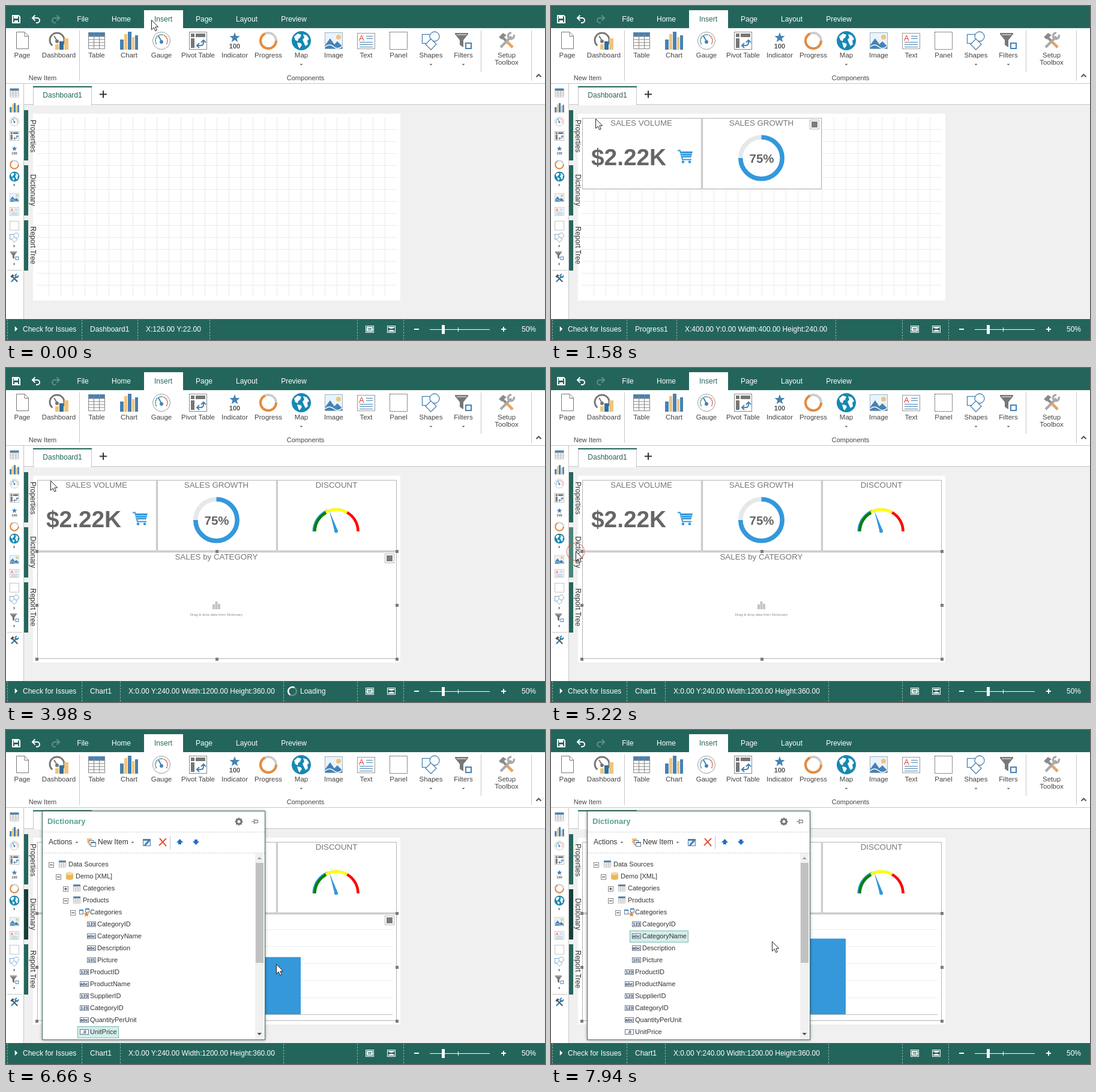
Write an HTML page that moves like this. It is 898x558 px and loops after 8 s.

```html
<!DOCTYPE html>
<html lang="en">
<head>
<meta charset="utf-8">
<title>Dashboard designer</title>
<style>
html, body { margin: 0; width: 100%; height: 100%; overflow: hidden; background: #fff; }
svg { display: block; width: 898px; height: 558px; font-family: "Liberation Sans", Arial, sans-serif; }
</style>
</head>
<body>
<svg id="stage" viewBox="0 0 898 558" xmlns="http://www.w3.org/2000/svg"></svg>
<script>
const GREEN = '#24655b', BLUE = '#3498db', STEEL = '#4682b4', GRAY = '#777', SAND = '#f0c47c';
const LINE = '#c6c6c6', INK = '#444';

// Markup helpers
const rect = (x, y, w, h, fill, more = '') => `<rect x="${x}" y="${y}" width="${w}" height="${h}" fill="${fill}" ${more}/>`;
const box = (x, y, w, h, stroke, fill = '#fff', more = '') => rect(x + .5, y + .5, w - 1, h - 1, fill, `stroke="${stroke}" ${more}`);
const fill = (d, color, more = '') => `<path d="${d}" fill="${color}" ${more}/>`;
const line = (d, color, w = 1, more = '') => `<path d="${d}" fill="none" stroke="${color}" stroke-width="${w}" ${more}/>`;
const dot = (x, y, r, color, more = '') => `<circle cx="${x}" cy="${y}" r="${r}" fill="${color}" ${more}/>`;
const text = (x, y, s, size, color, more = '') => `<text x="${x}" y="${y}" font-size="${size}" fill="${color}" ${more}>${s}</text>`;
const mid = (x, y, s, size, color, more = '') => text(x, y, s, size, color, 'text-anchor="middle" ' + more);
const group = (s, more = '') => `<g ${more}>${s}</g>`;
const hidden = (id, s) => group(s, `id="${id}" display="none"`);
const at = (x, y, s, k = 1) => group(s, `transform="translate(${x} ${y}) scale(${k})"`);
const down = (x, y, w = 3, color = '#666') => fill(`M${x - w} ${y - w / 2}h${2 * w}l${-w} ${w}z`, color);
const right = (x, y, w = 3, color = '#666') => fill(`M${x - w / 2} ${y - w}v${2 * w}l${w} ${-w}z`, color);
const list = (n, f) => Array.from({ length: n }, (_, i) => f(i)).join('');

// Angles run clockwise from the top, in degrees
function arc(cx, cy, r, a0, a1) {
  const p = a => `${(cx + r * Math.sin(a * Math.PI / 180)).toFixed(2)} ${(cy - r * Math.cos(a * Math.PI / 180)).toFixed(2)}`;
  return `M${p(a0)}A${r} ${r} 0 ${a1 - a0 > 180 ? 1 : 0} 1 ${p(a1)}`;
}

function star(r) {
  const p = i => {
    const a = i * Math.PI / 5, q = i % 2 ? r * .42 : r;
    return `${(q * Math.sin(a)).toFixed(2)} ${(-q * Math.cos(a)).toFixed(2)}`;
  };
  return 'M' + Array.from({ length: 10 }, (_, i) => p(i)).join('L') + 'Z';
}

const tableIcon = rect(-14, -14, 28, 28, '#fff') + rect(-14, -14, 28, 7, STEEL) +
  line('M-13.5-14V13.5H13.5V-14M-4.5-14V13M4.5-14V13M-14-7H14M-14-2H14M-14 3H14M-14 8H14', '#858585');
const funnel = fill('M-11-13H11V-11L3-1V11L-3 7V-1L-11-11Z', GRAY) + line('M-8-10H8', '#fff');
const tools = (a, b) =>
  line('M-8-7L10 11', a, 4) + fill('M-13-6L-6-13L0-9L-3-7L-8-2Z', a) +
  line('M8-7L-10 11', b, 4) + line('M12-10A5 5 0 1 1 8-13', b, 3.5);

// Icons are drawn around 0,0 in a box of 30
const icons = {
  page: fill('M-9.500-14.500H4L10.500-8V13.500H-9.500Z', '#fff', `stroke="${GRAY}"`) + line('M4-14V-7.500H10', GRAY),
  dash: line(arc(-3, -1, 12, -140, 140), GRAY, 3) + line('M-3 0L-8-8', GRAY, 2) + dot(-3, 1, 3, GRAY) +
    rect(-6, 6, 6, 9, SAND) + rect(1, 1, 7, 14, '#2f6f9f') + rect(9, -4, 7, 19, SAND),
  table: tableIcon,
  chart: rect(-15, -2, 6, 17, STEEL) + rect(-8, -11, 5, 26, SAND) + rect(-2, -15, 6, 30, STEEL) +
    rect(5, -6, 4, 21, SAND) + rect(10, -9, 5, 24, STEEL),
  gauge: dot(0, 0, 14.5, '#fff', 'stroke="#999"') + line(arc(0, 0, 10, -125, 20), '#3f8f93', 2, 'stroke-dasharray="2 1"') +
    line(arc(0, 0, 10, 25, 125), '#d9604f', 2, 'stroke-dasharray="2 1"') + line('M0 1L-5-8', STEEL, 2) + dot(0, 2, 3, STEEL),
  pivot: box(-15, -15, 30, 30, '#888') + rect(-12, -12, 6, 6, GRAY) + rect(-4, -12, 16, 6, GRAY) + rect(-12, -4, 6, 16, GRAY) +
    line('M-1 8H4Q9 8 9 3V0M2 4L-2 8L2 12M5 3L9-1L13 3', STEEL, 2),
  indicator: at(0, -5, fill(star(9), STEEL)) + mid(0, 13, '100', 11, '#555', 'font-weight="bold"'),
  progress: dot(0, 0, 13, 'none', 'stroke="#ccc" stroke-width="4"') + line(arc(0, 0, 13, 90, 335), '#e88a3c', 4),
  map: dot(0, 0, 16, '#1688b2') + fill('M-12-7L-6-12L0-10L-2-5L-5-3L-6 1L-10-1ZM-7 3L-1 4L1 7L-3 13L-5 10ZM3-11L9-9L13-3L10 0L11 6L7 9L4 3L2-2L5-5Z', '#fff'),
  image: box(-15, -14, 30, 28, '#9bb4c8', '#eaf3fa') + dot(8, -6, 4, SAND) +
    fill('M-14 7L-6-4L1 6L6 1L14 9V13H-14Z', STEEL) + line('M-14 10Q-7 4 0 10T14 9', '#fff', 1.5),
  text: box(-15, -13, 30, 27, '#999') + text(-12, 0, 'A', 13, '#e03c32') +
    line('M0-7.500H11M0-3.500H11M-11 2.500H11M-11 6.500H11M-11 10.500H11', STEEL),
  panel: box(-15, -15, 30, 30, '#555', '#fff', 'stroke-dasharray="2 1"'),
  shapes: group(box(-15, -11, 16, 16, STEEL) + dot(6, -7, 8, '#fff', `stroke="${STEEL}"`) +
    fill('M0-3L9 6L0 15L-9 6Z', '#fff', `stroke="${STEEL}"`), 'stroke-width="1.3"'),
  filter: at(-3, 0, funnel) + rect(4, 4, 9, 9, '#fff', `stroke="${STEEL}" stroke-width="2"`),
  tools: tools('#8a8a8a', '#a9a9a9') + line('M1 2L10 11', '#e9a35c', 4),
  toolsDark: tools('#4a5560', '#2f7aa8')
};

function topBar() {
  const names = [['File', 128], ['Home', 192], ['Insert', 262], ['Page', 330], ['Layout', 401], ['Preview', 479.5]];
  return rect(0, 0, 898, 37, GREEN) + rect(230, 7, 65, 30, '#fff') +
    names.map(([s, x]) => mid(x, 26, s, 12, s === 'Insert' ? GREEN : '#fff')).join('') +
    line('M11 16H21L23 18V28H11Z', '#fff', 2) + rect(13, 17, 7, 4, '#fff') + rect(14, 24, 6, 4, '#fff') +
    line('M44 20H52A4 4 0 0 1 52 28H50M48.500 15.500L44 20L48.500 24.500', '#fff', 2) +
    line('M89 20H81A4 4 0 0 0 81 28H83M84.500 15.500L89 20L84.500 24.500', '#5f9088', 2);
}

function ribbon() {
  const items = [['page', 27, 'Page'], ['dash', 88, 'Dashboard'], ['table', 151, 'Table'], ['chart', 205, 'Chart'],
    ['gauge', 259, 'Gauge'], ['pivot', 320, 'Pivot Table'], ['indicator', 381, 'Indicator'], ['progress', 437, 'Progress'],
    ['map', 492, 'Map'], ['image', 546, 'Image'], ['text', 600, 'Text'], ['panel', 654, 'Panel'],
    ['shapes', 708, 'Shapes'], ['filter', 762, 'Filters'], ['tools', 834, 'Setup']];
  return rect(0, 37, 898, 93, '#fff') + rect(0, 129, 898, 1, LINE) +
    items.map(([k, x, s]) => at(x, 58, icons[k]) + mid(x, 86, s, 11.5, INK)).join('') +
    mid(834, 98, 'Toolbox', 11.5, INK) + [492, 708, 762].map(x => down(x, 98, 2.5)).join('') +
    mid(61, 124, 'New Item', 11, INK) + mid(499, 124, 'Components', 11, INK) +
    rect(122, 41, 1, 84, LINE) + rect(791, 41, 1, 69, LINE) + rect(875, 41, 1, 84, LINE) +
    line('M883.500 118.500L887.500 114.500L891.500 118.500', '#555', 2);
}

function sideBar() {
  const items = [['table', 145], ['chart', 170], ['gauge', 193], ['pivot', 217], ['indicator', 241], ['progress', 265],
    ['map', 285], ['image', 320], ['text', 343], ['panel', 367], ['shapes', 387], ['filter', 417], ['toolsDark', 455]];
  return rect(0, 130, 29, 393, '#fff') + rect(29, 130, 1, 393, LINE) + rect(2, 441, 25, 1, LINE) +
    items.map(([k, y]) => at(14, y, icons[k], .52)).join('') + [299, 401, 431].map(y => right(14, y, 2.5)).join('');
}

function workspace() {
  return rect(30, 130, 868, 34, '#fff') + rect(30, 164, 868, 1, LINE) + rect(30, 165, 868, 358, '#f0f0f0') +
    box(45, 134, 98, 32, LINE) + rect(46, 164, 96, 2, '#fff') + rect(45, 134, 98, 2, GREEN) +
    mid(94, 153, 'Dashboard1', 12, GREEN) + line('M156 147.500H168M162 141.500V153.500', '#333', 2) +
    rect(45, 180, 612, 312, '#fff') +
    list(29, i => rect(71 + 20 * i, 186, 1, 300, '#ebebeb')) + list(14, i => rect(51, 206 + 20 * i, 600, 1, '#ebebeb'));
}

function dockTabs() {
  return [['Properties', 174, 190], ['Dictionary', 266, 281], ['Report Tree', 358, 368]].map(([s, y, ty]) =>
    rect(30, y, 7, 84, GREEN, s === 'Dictionary' ? 'id="dock"' : '') +
    text(0, 0, s, 12, '#333', `transform="translate(41 ${ty}) rotate(90)"`)).join('');
}

// Tiles: x, y, width, height of the selection frame
const frames = [[51, 186, 200, 120], [251, 186, 200, 120], [451, 186, 200, 120], [51, 306, 600, 180]];
const titles = ['SALES VOLUME', 'SALES GROWTH', 'DISCOUNT', 'SALES by CATEGORY'];

const cart = line('M211 241.500H215L219 256.500H234', BLUE, 2) + fill('M216 243H236L233.500 253H219Z', BLUE) +
  line('M216 246.500H235M217 250H234', '#fff', .7) + dot(220, 260.500, 2.3, BLUE) + dot(231, 260.500, 2.3, BLUE);

const contents = [
  text(67, 266, '$2.22K', 38.8, '#666', 'font-weight="bold"') + cart,
  line(arc(350.5, 254, 34.7, 270, 360), '#e6e9ea', 7.6) + line(arc(350.5, 254, 34.7, 0, 270), BLUE, 7.6) +
    mid(351, 262, '75%', 20.5, '#666', 'font-weight="bold"'),
  line(arc(550, 273, 38, -90, -22), BLUE, 3) + line(arc(550, 273, 35.5, -90, -28), 'green', 4.5) +
    line(arc(550, 273, 38.5, -20, 90), '#e4e4e4', 1.5) +
    line(arc(550, 273, 36.5, -28, 30), '#ff0', 4.5) + line(arc(550, 273, 36.5, 30, 90), '#f00', 4.5) +
    fill('M538.500 238L552.500 271L547.500 273Z', BLUE) + dot(550, 272.5, 3, BLUE),
  group(rect(344, 395, 4, 8, '#c4c4c4') + rect(348.5, 390, 4, 13, '#c4c4c4') + rect(353, 394, 4, 9, '#c4c4c4') +
    mid(350.5, 414, 'Drag &amp; drop data from Dictionary', 6, '#888'), 'id="empty"') +
    hidden('plot', list(5, i => rect(74, Math.round(333 + 28.4 * i), 570, 1, '#ececec')) +
      rect(227, 348.5, 264, 126.5, BLUE, 'id="bar"') + rect(74, 475, 570, 1, '#bdbdbd'))
];

function tile([x, y, w, h], i) {
  const handles = [0, 1, 2].flatMap(a => [0, 1, 2].map(b => a === 1 && b === 1 ? '' :
    rect(x + a * w / 2 - 2, y + b * h / 2 - 2, 5, 5, '#7c7c7c'))).join('');
  const bx = i === 2 ? x - 36 : x + w + 8;
  const buttons = i === 3 ? '' : box(bx, 190, 28, 28, '#c4c4c4') + box(bx, 225, 28, 28, '#c4c4c4') +
    at(bx + 14, 204, line('M-5 5L6-6', STEEL, 5) + fill('M-9 9L-7.500 3.500L-3.500 7.500Z', '#555')) +
    at(bx + 14, 239, funnel, .9);
  return hidden('tile' + i, box(x + 1, y + 1, w - 1, h - 1, '#b4b4b4') +
      mid(x + w / 2 - .5, y + 14, titles[i], 13.333, '#777') + contents[i]) +
    hidden('sel' + i, handles + buttons) +
    hidden('grip' + i, box(x + w - 20, y + 4, 16, 16, '#b4b4b4') + rect(x + w - 17, y + 7, 10, 10, '#7c7c7c'));
}

function statusBar() {
  const sep = (x, id = '') => line('M.5 524V558', '#8fb3ad', 1, `stroke-dasharray="3 2" transform="translate(${x} 0)" ${id}`);
  const fit = d => box(0, 0, 14, 12, '#fff', 'none') + rect(2, 2, 10, 2, '#fff') + rect(2, 8, 10, 2, '#fff') +
    (d ? fill('M4 5L7 2L10 5ZM4 7L7 10L10 7Z', '#fff') : fill('M1 6L4 3V9ZM13 6L10 3V9Z', '#fff') + rect(4, 5.3, 6, 1.5, '#fff'));
  return rect(0, 523, 898, 35, GREEN) + [2, 126, 585, 662].map(x => sep(x)).join('') +
    sep(219, 'id="sep1"') + sep(339, 'id="sep2"') + right(17, 539.5, 4.5, '#fff') +
    text(28, 544, 'Check for Issues', 12, '#fff') + text(140, 544, '', 12, '#fff', 'id="name"') +
    text(233, 544, '', 12, '#fff', 'id="info"') +
    hidden('loading', dot(15, 540, 7, 'none', 'stroke="#5d8d86" stroke-width="2.5"') +
      line(arc(15, 540, 7, -150, 30), '#fff', 2.5) + text(28, 544, 'Loading', 12, '#fff')) +
    at(599, 534, fit(false)) + at(635, 534, fit(true)) +
    rect(680, 539, 8, 2, '#fff') + rect(706, 540, 100, 1, '#fff') + rect(753, 537, 1, 7, '#fff') +
    rect(726, 533, 5, 15, '#fff') + rect(825, 539, 8, 2, '#fff') + rect(828, 536, 2, 8, '#fff') +
    text(859, 544, '50%', 12, '#fff');
}

// Tree rows: label, depth, icon, expander
const rows = [['Data Sources', 0, 'table', '-'], ['Demo [XML]', 1, 'db', '-'], ['Categories', 2, 'table', '+'],
  ['Products', 2, 'table', '-'], ['Categories', 3, 'link', '-'], ['CategoryID', 4, '123'], ['CategoryName', 4, 'abc'],
  ['Description', 4, 'abc'], ['Picture', 4, '101'], ['ProductID', 3, '123'], ['ProductName', 3, 'abc'],
  ['SupplierID', 3, '123'], ['CategoryID', 3, '123'], ['QuantityPerUnit', 3, 'abc'], ['UnitPrice', 3, '.0']];

function rowIcon(kind) {
  const small = at(0, 0, tableIcon, .42);
  if (kind === 'table') return small;
  if (kind === 'db') return fill('M-6-4A6 2.500 0 0 1 6-4V4A6 2.500 0 0 1-6 4Z', '#e9b85c') + `<ellipse cy="-4" rx="6" ry="2.3" fill="#f6d99b"/>`;
  if (kind === 'link') return box(-8, -4, 7, 8, '#5f7f9f') + rect(-8, -4, 7, 2, STEEL) + box(2, -6, 7, 7, '#5f7f9f') +
    rect(2, -6, 7, 2, STEEL) + at(4, 4, fill(star(5), '#e8862e'));
  return box(-7, -4, 15, 9, '#64748a') + mid(.5, 3, kind, 7.5, '#1f3552', 'font-weight="bold"');
}

function treeRow([label, depth, kind, mark], i) {
  const x = 104 + 12 * depth, y = 224 + 20 * i;
  const expander = mark ? at(x - 29, y + 1, box(-4, -4, 9, 9, '#888') + rect(-2, 0, 5, 1, '#333') +
    (mark === '+' ? rect(0, -2, 1, 5, '#333') : '')) : '';
  return rect(x - 20.5, y - 8.5, 0, 19, '#d3eeea', `stroke="#7fb9b0" id="mark${i}" display="none"`) + expander +
    at(x - 10, y, rowIcon(kind)) + text(x, y + 4, label, 11, '#333', `id="row${i}"`);
}

function dictionary() {
  const dashes = 'stroke-dasharray="1 2"';
  return hidden('dict', rect(60, 135, 372, 383, '#000', 'filter="url(#soft)" opacity=".4"') + box(60, 135, 372, 383, '#3f6f67') +
    text(69, 157, 'Dictionary', 13, '#5aa095', 'font-weight="bold"') +
    dot(388, 153, 4, 'none', 'stroke="#777" stroke-width="3"') + list(8, i => rect(386.8, 146.5, 2.5, 3, GRAY, `transform="rotate(${45 * i} 388 153)"`)) +
    line('M409 153H413M413.500 149V157M414 150.500H419.500V155H414', '#666') +
    line('M61 170.500H431M61 205.500H431', '#aaa', 1, dashes) +
    text(71, 191, 'Actions', 12, '#333') + down(118, 188, 2.5) +
    rect(135, 181, 8, 8, SAND) + box(138, 184, 8, 8, '#777') + box(141, 187, 9, 8, '#777') + rect(141, 187, 9, 2, STEEL) +
    text(153, 191, 'New Item', 12, '#333') + down(211, 188, 2.5) +
    box(228, 182, 13, 12, STEEL, '#e5eff7') + rect(228, 182, 13, 3, STEEL) + line('M231 193L240 183', STEEL, 3) +
    line('M256 181L267 194M267 181L255 193', '#e2553d', 2) + rect(273, 177, 1, 22, LINE) +
    group(fill('M289.500 182L295 188H292V191H287V188H284ZM316.500 192L322 186H319V183H314V186H311Z', '#1f6fc4'), 'id="arrows"') +
    rect(415, 206, 15, 311, '#f1f1f1') + rect(416, 222, 13, 167, '#c1c1c1') +
    fill('M418.500 216H426L422.200 212Z', '#a3a3a3') + fill('M418.500 506H426L422.200 510Z', '#505050') +
    rows.map(treeRow).join(''));
}

const stage = document.getElementById('stage');
stage.innerHTML = '<defs><filter id="soft" x="-5%" y="-5%" width="110%" height="110%"><feGaussianBlur stdDeviation="2.5"/></filter></defs>' +
  workspace() + frames.map(tile).join('') + sideBar() + dockTabs() + topBar() + ribbon() + statusBar() + dictionary() +
  dot(0, 0, 0, 'none', 'id="ring" stroke="#dc4b35" stroke-width="1.2"') +
  fill('M.5.5V16.500L4.200 13L6.700 18.700L9.200 17.600L6.800 12H11.700Z', '#fff', 'id="cursor" stroke="#222" stroke-linejoin="round"');

const $ = id => document.getElementById(id);
const show = (id, on) => $(id).setAttribute('display', on ? 'inline' : 'none');
const within = (t, a, b) => t >= a && t < b;

// Cursor path: time, x, y
const path = [[4500, 74, 188], [5060, 41, 306], [5540, 41, 306], [6020, 168, 506], [6100, 168, 506], [6180, 235, 482],
  [6420, 450, 391], [7140, 450, 391], [7460, 185, 349], [7620, 185, 349], [7940, 368, 353], [8020, 414, 354]];
const clicks = [[5100, 41, 307, 5380], [6024, 168, 506, 6400], [7480, 185, 349, 7800]];

// Status texts: start time, name, position
const status = [[0, 'Dashboard1', 'X:126.00 Y:22.00'], [380, 'Dashboard1', 'X:0.00 Y:0.00 Width:400.00 Height:240.00'],
  [1280, 'Indicator1', 'X:0.00 Y:0.00 Width:400.00 Height:240.00'], [1580, 'Progress1', 'X:400.00 Y:0.00 Width:400.00 Height:240.00'],
  [2780, 'Gauge1', 'X:800.00 Y:0.00 Width:400.00 Height:240.00'], [3980, 'Chart1', 'X:0.00 Y:240.00 Width:1200.00 Height:360.00']];

// Per tile: appears, selected, replaced by the next one
const stages = [[380, 680, 1580], [1580, 2480, 2780], [2780, 3080, 3980], [3980, 3980, 4580]];

function cursorAt(t) {
  if (t < 80) return [242, 23];
  if (t < 380) return [250, 21];
  if (t <= path[0][0]) return path[0].slice(1);
  const i = path.findIndex(p => p[0] > t);
  const [t0, x0, y0] = path[i - 1], [t1, x1, y1] = path[i];
  const k = (t - t0) / (t1 - t0);
  return [x0 + (x1 - x0) * k, y0 + (y1 - y0) * k];
}

function setStatus(t) {
  const [, name, info] = status.filter(s => s[0] <= t).pop();
  $('name').textContent = name;
  $('info').textContent = info;
  const x1 = Math.round(154 + $('name').getComputedTextLength());
  const x2 = Math.round(x1 + 28 + $('info').getComputedTextLength());
  $('info').setAttribute('x', x1 + 14);
  $('sep1').setAttribute('transform', `translate(${x1} 0)`);
  $('sep2').setAttribute('transform', `translate(${x2} 0)`);
  $('loading').setAttribute('transform', `translate(${x2} 0)`);
  show('loading', within(t, 680, 1280) || within(t, 3080, 3680) || within(t, 3980, 4580));
}

function markRow(i, on) {
  show('mark' + i, on);
  if (on) $('mark' + i).setAttribute('width', Math.round($('row' + i).getComputedTextLength()) + 23);
}

function render(ms) {
  // Movement advances in steps of 80 ms
  const t = ms < 4580 ? ms : 4580 + Math.floor((ms - 4580) / 80) * 80;
  const [cx, cy] = cursorAt(t);
  $('cursor').setAttribute('transform', `translate(${Math.round(cx)} ${Math.round(cy)})`);

  stages.forEach(([from, pick, to], i) => {
    show('tile' + i, t >= from);
    show('sel' + i, t >= pick && (i === 3 || t < to));
    show('grip' + i, within(t, from, to) || (i === 3 && within(t, 6500, 7220)));
  });
  setStatus(t);

  const open = t >= 5380;
  show('dict', open);
  $('dock').setAttribute('fill', open ? '#163f39' : t >= 5060 ? '#4a8478' : GREEN);
  $('arrows').setAttribute('opacity', t < 6020 ? .4 : 1);
  markRow(14, within(t, 6020, 7460));
  markRow(6, t >= 7460);

  show('empty', t < 6500);
  show('plot', t >= 6500);
  const grow = 1 - Math.pow(1 - Math.min(1, Math.max(0, (t - 6420) / 640)), 3);
  $('bar').setAttribute('y', 475 - 126.5 * grow);
  $('bar').setAttribute('height', 126.5 * grow);

  const click = clicks.find(c => within(t, c[0], c[3]));
  show('ring', click);
  if (click) {
    const r = (t - click[0]) * .122, ring = $('ring');
    ring.setAttribute('cx', click[1]);
    ring.setAttribute('cy', click[2]);
    ring.setAttribute('r', r);
    ring.setAttribute('opacity', Math.max(0, 1 - r / 45));
  }
}

const start = performance.now();
function tick() {
  render((performance.now() - start) % 8000);
  requestAnimationFrame(tick);
}
tick();
</script>
</body>
</html>
```
